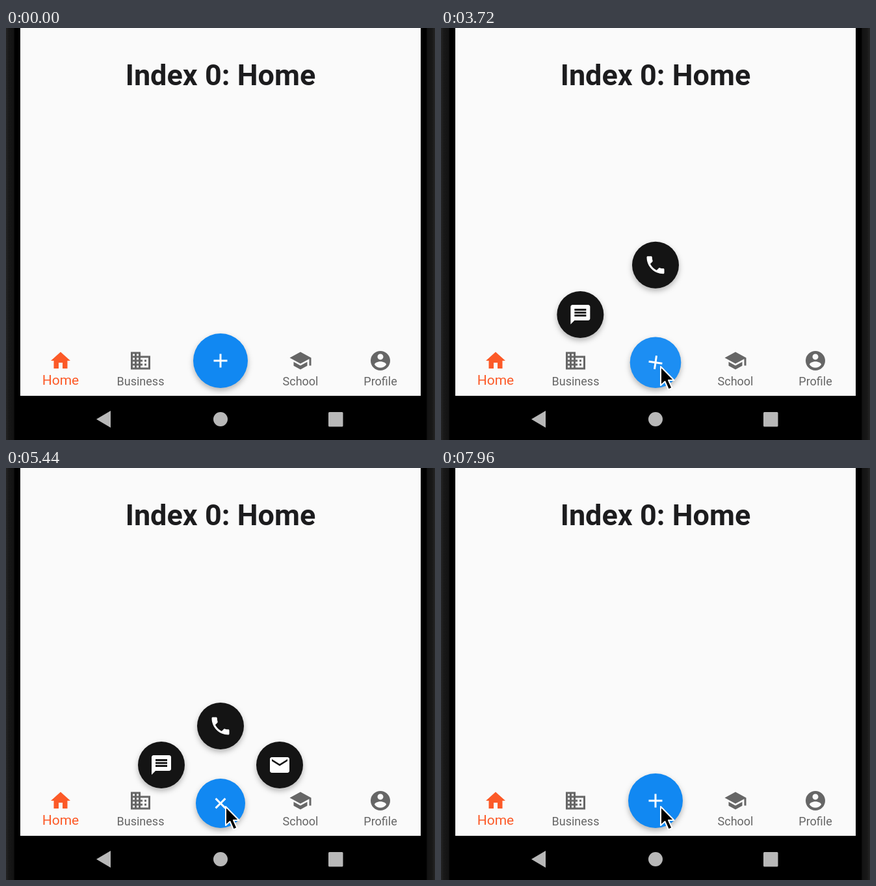
Animation, 660 px wide and 634 px high, one loop 8000 ms. Source, as an HTML page:

```html
<!DOCTYPE html>
<html lang="en">
<head>
<meta charset="utf-8">
<title>Circular action menu</title>
<style>
  html, body { margin: 0; width: 100%; height: 100%; overflow: hidden; background: #000; }
  svg { display: block; width: 660px; height: 634px; }
  text { font-family: Roboto, sans-serif; text-anchor: middle; }
  .title { font-size: 45px; font-weight: 700; fill: #1c1c1e; }
  .item { fill: #666; font-size: 18px; }
  .item.active { fill: #fc5a28; font-size: 21px; }
  .raised { filter: drop-shadow(0 4px 4px rgba(0, 0, 0, .28)); }
</style>
</head>
<body>
<svg id="stage" viewBox="0 0 660 634">
  <defs>
    <linearGradient id="bezel">
      <stop offset="0" stop-color="#242424"/>
      <stop offset=".2" stop-color="#181818"/>
      <stop offset=".55" stop-color="#121212"/>
      <stop offset=".6" stop-color="#000"/>
    </linearGradient>
  </defs>
  <rect width="660" height="634"/>
  <rect width="22" height="634" fill="url(#bezel)"/>
  <rect width="22" height="634" fill="url(#bezel)" transform="matrix(-1 0 0 1 660 0)"/>
  <rect x="22" width="616" height="566" fill="#fafafa"/>
  <text class="title" x="330" y="88">Index 0: Home</text>
  <g id="tabs"></g>
  <g fill="#b8b8b8">
    <path d="M139 602L161 589V615Z"/>
    <circle cx="330" cy="602" r="11"/>
    <rect x="496" y="591" width="22.5" height="22.5" rx="1.5"/>
  </g>
  <g id="actions"></g>
  <g id="fab">
    <circle id="disc" class="raised" fill="#1188f2"/>
    <circle id="splash" fill="#fff"/>
    <g id="plus" fill="#fff"></g>
  </g>
  <path id="cursor" d="M0 0V29L6.5 23L12 35.5L17.5 33L12 21H20.5Z"
        stroke="#fff" stroke-width="2" stroke-linejoin="round"/>
</svg>
<script>
const icons = {
  home: 'M10 20v-6h4v6h5v-8h3L12 3 2 12h3v8z',
  business: 'M12 7V3H2v18h20V7H12zM6 19H4v-2h2v2zm0-4H4v-2h2v2zm0-4H4V9h2v2zm0-4H4V5h2v2zm4 12H8v-2h2v2zm0-4H8v-2h2v2zm0-4H8V9h2v2zm0-4H8V5h2v2zm10 12h-8v-2h2v-2h-2v-2h2v-2h-2V9h8v10zm-2-8h-2v2h2v-2zm0 4h-2v2h2v-2z',
  school: 'M5 13.18v4L12 21l7-3.82v-4L12 17l-7-3.82zM12 3L1 9l11 6 9-4.91V17h2V9L12 3z',
  profile: 'M12 2C6.48 2 2 6.48 2 12s4.48 10 10 10 10-4.48 10-10S17.52 2 12 2zm0 3c1.66 0 3 1.34 3 3s-1.34 3-3 3-3-1.34-3-3 1.34-3 3-3zm0 14.2c-2.5 0-4.71-1.28-6-3.22.03-1.99 4-3.08 6-3.08 1.99 0 5.97 1.09 6 3.08-1.29 1.94-3.5 3.22-6 3.22z',
  message: 'M20 2H4c-1.1 0-1.99.9-1.99 2L2 22l4-4h14c1.1 0 2-.9 2-2V4c0-1.1-.9-2-2-2zm-2 12H6v-2h12v2zm0-3H6V9h12v2zm0-3H6V6h12v2z',
  phone: 'M6.62 10.79c1.44 2.83 3.76 5.14 6.59 6.59l2.2-2.2c.27-.27.67-.36 1.02-.24 1.12.37 2.33.57 3.57.57.55 0 1 .45 1 1V20c0 .55-.45 1-1 1-9.39 0-17-7.61-17-17 0-.55.45-1 1-1h3.5c.55 0 1 .45 1 1 0 1.25.2 2.45.57 3.57.11.35.03.74-.25 1.02l-2.2 2.2z',
  mail: 'M20 4H4c-1.1 0-1.99.9-1.99 2L2 18c0 1.1.9 2 2 2h16c1.1 0 2-.9 2-2V6c0-1.1-.9-2-2-2zm0 4l-8 5-8-5V6l8 5 8-5v2z',
  add: 'M19 13h-6v6h-2v-6H5v-2h6V5h2v6h6v2z'
};
const LOOP = 8000, OPEN = 3420, CLOSE = 7000, ORIGIN = { x: 330, y: 516 };
const $ = id => document.getElementById(id);
const progress = (t, start, length) => Math.min(1, Math.max(0, (t - start) / length));
const mix = (a, b, p) => a + (b - a) * p;
const move = (el, x, y) => el.setAttribute('transform', `translate(${x} ${y})`);
const icon = name => `<path d="${icons[name]}" transform="scale(1.5) translate(-12 -12)"/>`;
const elasticOut = p => p <= 0 ? 0 : p >= 1 ? 1
  : 1 + 2 ** (-10 * p) * Math.sin((p - 0.1) * 5 * Math.PI);

const tabs = [['home', 'Home', 0], ['business', 'Business', 1], ['school', 'School', 3], ['profile', 'Profile', 4]];
$('tabs').innerHTML = tabs.map(([name, label, slot]) =>
  `<g class="item${slot ? '' : ' active'}" transform="translate(${Math.round(83.6 + slot * 123.2)} 512)">
    ${icon(name)}<text y="${slot ? 38 : 37}">${label}</text></g>`).join('');
$('plus').innerHTML = icon('add');

const actions = [
  { name: 'message', dx: -91, dy: -59, start: OPEN },
  { name: 'phone', dx: 0, dy: -119, start: OPEN },
  { name: 'mail', dx: 91, dy: -59, start: 3790 }
];
$('actions').innerHTML = actions.map(({ name }) =>
  `<g><circle class="raised" r="36" fill="#141414"/><g fill="#fff">${icon(name)}</g></g>`).join('');
actions.forEach((action, i) => action.el = $('actions').children[i]);

function splashOpacity(t) {
  const pulse = start => progress(t, start, 140) * (1 - progress(t, start + 240, 220));
  return 0.18 * Math.max(pulse(OPEN - 100), pulse(CLOSE));
}

function draw(t) {
  const closing = progress(t, CLOSE, 560) ** 2;
  for (const { el, dx, dy, start } of actions) {
    const reach = elasticOut(progress(t, start, 1640)) * (1 - closing);
    el.style.display = reach > 0 ? '' : 'none';
    move(el, ORIGIN.x + dx * reach, ORIGIN.y + dy * reach);
  }

  const opened = t < CLOSE ? progress(t, OPEN, 700) : 1 - progress(t, CLOSE, 370);
  const radius = mix(42, 38, 1 - (1 - opened) ** 2);
  const angle = 45 * opened ** (t < CLOSE ? 2 : 1.2);
  move($('fab'), 330, 554 - radius);
  $('disc').setAttribute('r', radius);
  $('splash').setAttribute('r', radius);
  $('splash').setAttribute('opacity', splashOpacity(t));
  $('plus').setAttribute('transform', `rotate(${angle})`);

  const arrive = 1 - (1 - progress(t, 700, 850)) ** 2;
  move($('cursor'), mix(385, 338, arrive), mix(636, 521, arrive));
}

const begin = performance.now();
function tick() {
  draw((performance.now() - begin) % LOOP);
  requestAnimationFrame(tick);
}
tick();
</script>
</body>
</html>
```
